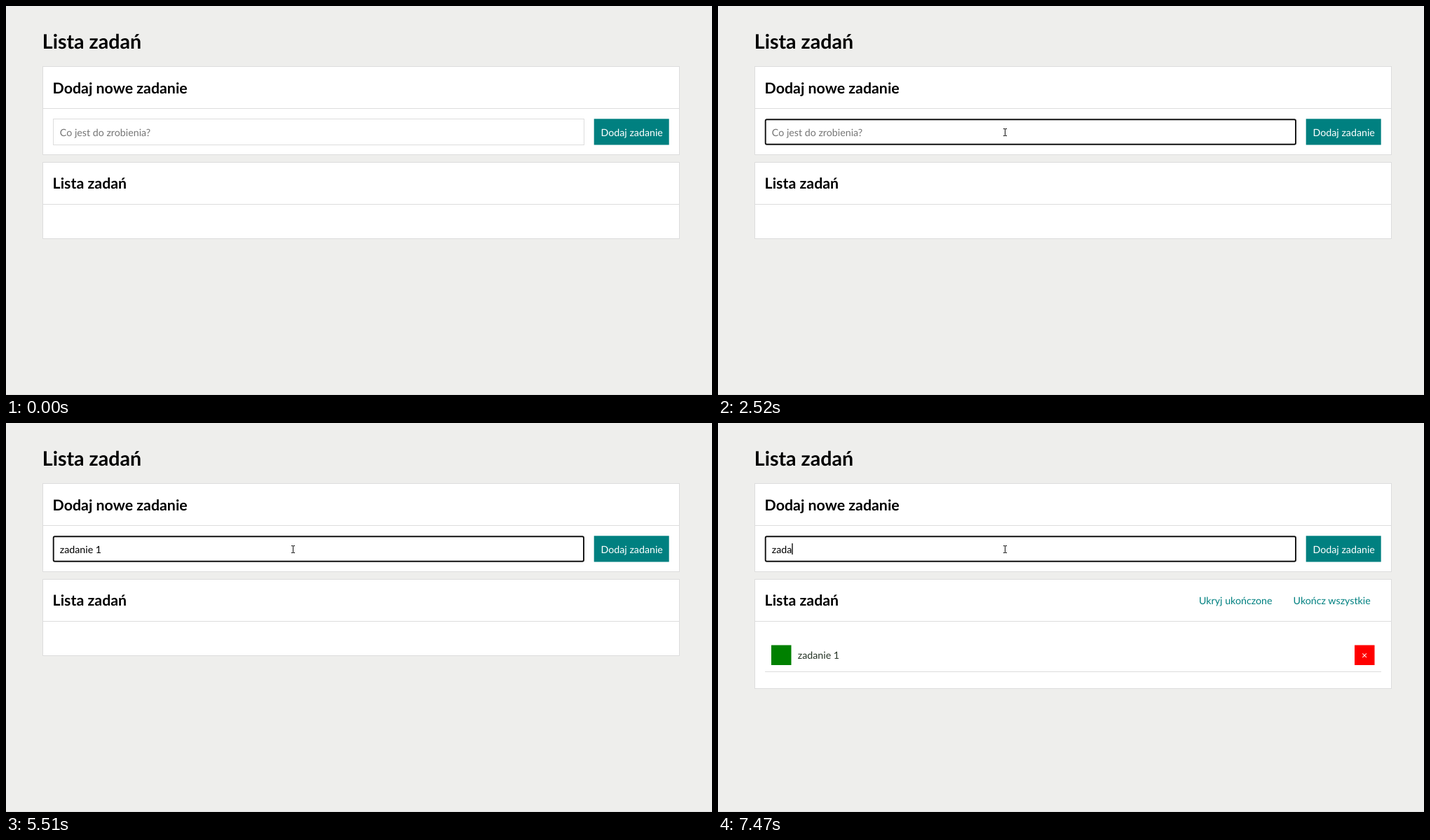
An HTML page for the animation above (8000 ms loop, 1007 by 556 pixels).

```html
<!DOCTYPE html>
<html lang="pl">
<head>
<meta charset="utf-8">
<title>Lista zadań</title>
<style>
  html, body { margin: 0; width: 100%; height: 100%; overflow: hidden; background: #eeeeec; }
  svg { display: block; font: 14.24px Lato, sans-serif; text-rendering: geometricPrecision; }
  .h1 { font-size: 28.6px; font-weight: 700; }
  .h2 { font-size: 21.36px; font-weight: 700; }
  .panel { fill: #fff; stroke: #ddd; }
  .line { stroke: #ddd; }
  .link { fill: teal; }
</style>
</head>
<body>
<svg width="1007" height="556" viewBox="0 0 1007 556">
  <path class="line" d="M0 555.5H1007"/>
  <text class="h1" x="51.8" y="61">Lista zadań</text>

  <rect class="panel" x="52.5" y="86.5" width="908" height="126"/>
  <path class="line" d="M52 146.5H961"/>
  <text class="h2" x="66.6" y="125">Dodaj nowe zadanie</text>
  <rect id="field" x="67.5" y="161.5" width="757" height="37" fill="#fff"/>
  <text id="entry" x="76.8" y="185.6" style="white-space: pre"></text>
  <rect id="caret" y="172" width="1.3" height="16"/>
  <rect x="838.7" y="161.3" width="107" height="37.2" fill="teal"/>
  <text x="848.5" y="185.6" fill="#fff">Dodaj zadanie</text>

  <rect id="list" class="panel" x="52.5" y="223.5" width="908" height="109"/>
  <path class="line" d="M52 283.5H961"/>
  <text class="h2" x="66.6" y="261">Lista zadań</text>
  <g id="task">
    <text class="link" x="686" y="259">Ukryj ukończone</text>
    <text class="link" x="820.6" y="259">Ukończ wszystkie</text>
    <rect x="76" y="317.5" width="28.5" height="28.5" fill="green"/>
    <text x="113.8" y="337" fill="#263426">zadanie 1</text>
    <rect x="908" y="317.5" width="28.5" height="28.5" fill="red"/>
    <text x="922.2" y="337" fill="#fff" text-anchor="middle">×</text>
    <path class="line" d="M67 355.5H946"/>
  </g>

  <circle id="click" cx="407.8" cy="179.8" r="11.3" fill="#ffff80"/>
  <path id="arrow" d="M0 0V15.5L3.6 12.2L6 17.8L8.4 16.8L6 11.3H11Z" fill="#fff" stroke="#000" stroke-width=".9"/>
  <path id="beam" d="M-2.5 -5H-.5M.5 -5H2.5M0 -5V5M-2.5 5H-.5M.5 5H2.5" fill="none" stroke="#111"/>
</svg>
<script>
const LOOP = 8000, FOCUS = 910, RELEASE = 1000, SUBMIT = 5780;
const MOVE = { start: 190, steps: 11, from: [926, 544], to: [409.5, 180.5] };

// [time, typed text, caret shown]
const STATES = [
  [0, '', 0], [910, '', 1], [1440, '', 0], [1970, '', 1], [2520, '', 0],
  [2590, 'z', 1], [2930, 'za', 1], [3060, 'zad', 1], [3260, 'zada', 1],
  [3660, 'zadan', 1], [3930, 'zadani', 1], [4180, 'zadanie', 1],
  [4380, 'zadanie ', 1], [4920, 'zadanie ', 0], [4990, 'zadanie 1', 1],
  [5510, 'zadanie 1', 0], [5780, '', 0], [6060, '', 1], [6590, '', 0],
  [6920, 'z', 1], [7120, 'za', 1], [7340, 'zad', 1], [7470, 'zada', 1]
];

const $ = id => document.getElementById(id);
const set = (id, attrs) => Object.entries(attrs).forEach(([k, v]) => $(id).setAttribute(k, v));
const show = (id, on) => set(id, { visibility: on ? 'visible' : 'hidden' });

function drawField(t) {
  const [, text, caret] = STATES.findLast(s => s[0] <= t);
  const focused = t >= FOCUS;
  set('field', focused
    ? { x: 67.7, y: 162.2, width: 756.3, height: 35.6, rx: 2, stroke: '#101010', 'stroke-width': 1.9 }
    : { x: 67.5, y: 161.5, width: 757, height: 37, rx: 0, stroke: '#ddd', 'stroke-width': 1 });
  const entry = $('entry');
  entry.textContent = text || 'Co jest do zrobienia?';
  entry.setAttribute('fill', text ? '#000' : '#757575');
  set('caret', { x: 76.8 + (text ? entry.getComputedTextLength() : 0) });
  show('caret', caret);
}

function drawPointer(t) {
  const { start, steps, from, to } = MOVE;
  const step = Math.floor((t - start) / (FOCUS - start) * steps + 1e-6);
  const p = Math.min(1, Math.max(0, step / steps));
  const ease = p * p * (3 - 2 * p);
  const [x, y] = from.map((a, i) => a + (to[i] - a) * ease);
  const inField = y < 199;
  const at = { transform: `translate(${x} ${y})` };
  set('arrow', at);
  set('beam', at);
  show('arrow', t >= start && !inField);
  show('beam', inField);
  show('click', t >= FOCUS && t < RELEASE);
}

function drawList(t) {
  const added = t >= SUBMIT;
  set('list', { height: added ? 156 : 109 });
  show('task', added);
}

const origin = performance.now();
function frame() {
  const t = Math.max(0, performance.now() - origin) % LOOP;
  drawField(t);
  drawPointer(t);
  drawList(t);
  requestAnimationFrame(frame);
}
frame();
</script>
</body>
</html>
```
